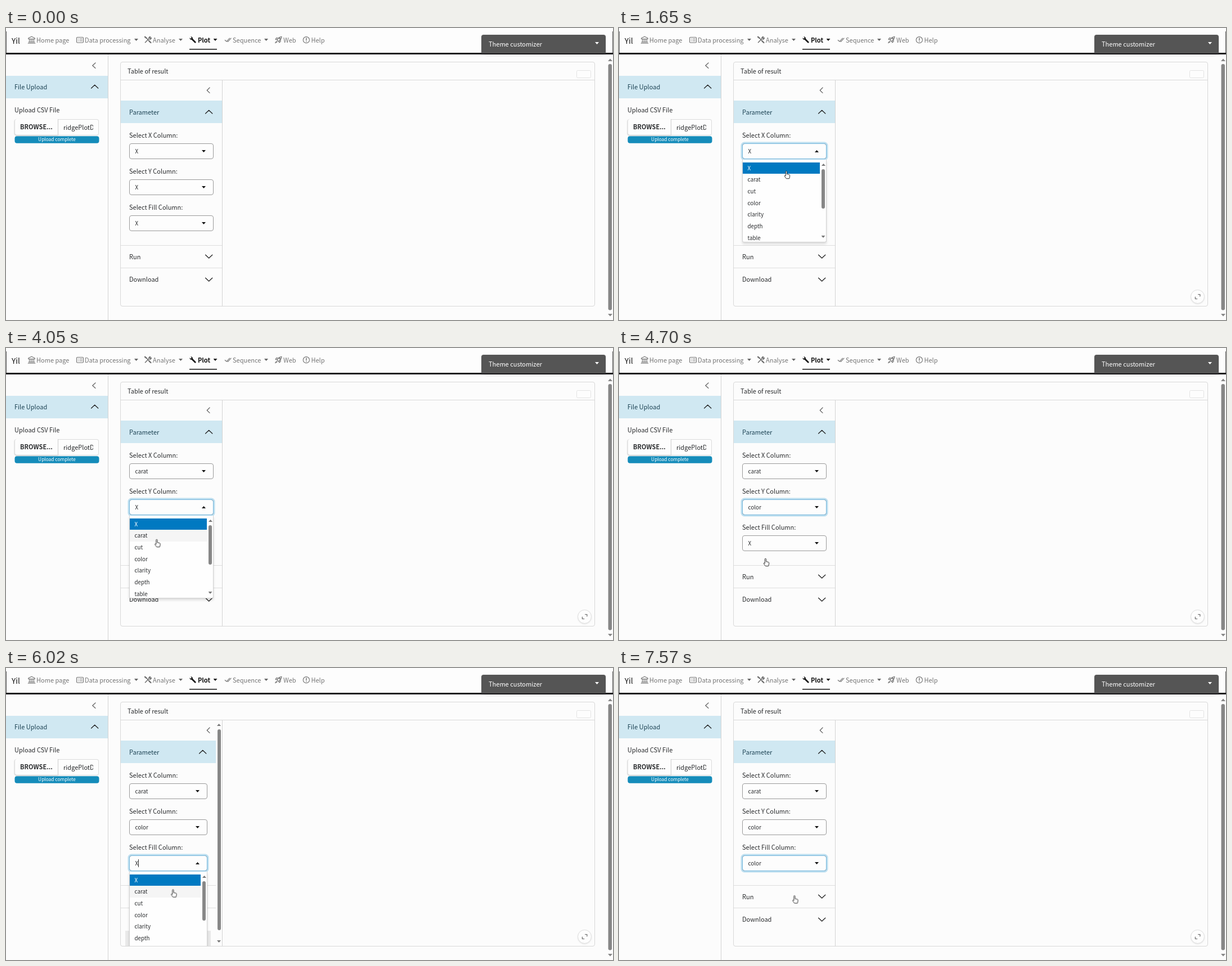
Write an HTML page that moves like this. It is 1079 by 519 pixels and loops after 8000 ms.

```html
<!DOCTYPE html>
<html lang="en">
<head>
<meta charset="utf-8">
<title>Ridge plot setup</title>
<style>
html, body { margin: 0; width: 100%; height: 100%; overflow: hidden; background: #fcfcfc; }
body, #stage { font: 11.03px/20px "Noto Sans CJK SC", "Noto Sans CJK JP", "Noto Sans", sans-serif; color: #2a2c2e; }
#stage { position: absolute; left: 0; top: 0; width: 1079px; height: 519px; overflow: hidden; }
#stage div, #stage span, #stage svg { position: absolute; box-sizing: border-box; white-space: nowrap; }
.band { background: #d0e8f2; height: 40px; color: #1d4354; }
.rule { left: 0; right: 0; height: 1px; background: #dedede; }
.line { fill: none; stroke: #222; stroke-width: 1.3; stroke-linecap: round; stroke-linejoin: round; }
.anim { animation: 8s step-end infinite; }
.bar { background: #878787; border-radius: 3px; }

#browse { left: 15px; top: 162px; width: 78px; height: 28px; background: #fdfdfd; border-radius: 4px 0 0 4px;
  border-left: 1px solid #ddd; border-right: 1px solid #ccc; box-shadow: 0 1px 2px #bbb; }
#file { left: 93px; top: 162px; width: 72px; height: 29px; border: 1px solid #dcdcdc; border-left: 0; border-radius: 0 4px 4px 0; background: #fdfdfd; }
#file span { left: 9px; top: 3px; width: 53px; overflow: hidden; }
#done { left: 15px; top: 191px; width: 151px; height: 13px; color: #fff; font-size: 8.35px; line-height: 13px; text-align: center; }
#theme { left: 845px; top: 12px; width: 221px; height: 33px; border-radius: 4px 4px 0 0; background: #555; color: #fff; box-shadow: 0 1px 3px #0003; }
#card { left: 203px; top: 60px; width: 844px; height: 435px; border: 1px solid #d8d8d8; border-radius: 4px; }
#pane { left: 204px; top: 93px; width: 181px; height: 401px; overflow: hidden; border-right: 1px solid #d4d4d4; }
#inner { left: 0; top: 0; width: 180px; height: 401px; animation-name: narrow; }
#full { left: 1016px; top: 465px; width: 25px; height: 25px; border: 1px solid #dedede; border-radius: 50%;
  background: #fdfdfd; box-shadow: 0 1px 2px #e6e6e6; animation: full 8s linear infinite; }

.box { left: 15px; right: 15px; height: 28px; border: 1px solid #9a9a9a; border-radius: 4px; background: #fdfdfd; }
.ring { left: 15px; right: 15px; height: 28px; border: 1px solid #75b6db; border-radius: 4px; box-shadow: 0 0 0 2.5px #bddff0; animation: 8s linear infinite; }
.val, .row { font-size: 9.8px; left: 9.5px; }
.caret { left: 15px; width: 1px; height: 14px; background: #333; }
.tri { width: 7px; height: 4px; background: #111; clip-path: polygon(0 0, 100% 0, 50% 100%); }
.up { transform: rotate(180deg); }
.drop { left: 15px; right: 15px; height: 147px; z-index: 5; background: #fefefe; border: solid #d2d2d2; border-width: 0 1px 1px;
  border-radius: 0 0 3px 3px; box-shadow: 0 3px 4px #0002; overflow: hidden; }
.shade { left: 8px; right: 9px; top: 374px; height: 27px; background: #e9e9e9; z-index: 4; }
.hit { left: 0; right: 11px; height: 20.7px; background: #f5f5f5; }
.pick { background: #0079c1; }
.row { left: 8.5px; }

#cursor { left: -8px; top: -10px; width: 20px; height: 24px; z-index: 9; animation: move 8s linear infinite; }
#cursor path { fill: #fff; stroke: #222; stroke-width: .95; stroke-linejoin: round; }
#arrow { animation-name: arrow; }
#hand { animation-name: hand; }
@keyframes narrow { 0% { width: 180px; } 72.125% { width: 169px; } 85.75% { width: 180px; } }
@keyframes full { 0%, 4% { opacity: 0; } 6%, 100% { opacity: 1; } }
</style>
</head>
<body>
<div id="stage">
  <svg width="1079" height="519" viewBox="0 0 1079 519" style="left:0;top:0">
    <path d="M0 0H1079V44H0z" fill="#fdfdfd"/>
    <path d="M.5 6V44M1078.5 6V44" stroke="#555"/>
    <path d="M0 44H1079V47H0z" fill="#1b1a1d"/>
    <path d="M850 47.5H1062V49.5Q1060 50.5 1056 50.5H856Q850 50.5 850 47.5z" fill="#eee"/>
    <path d="M181.5 47V519" stroke="#d4d4d4"/>
    <path d="M204 92.5H1046" stroke="#d8d8d8"/>
    <rect x="1014.5" y="75.5" width="25" height="13" rx="2" fill="#fdfdfd" stroke="#e3e3e3"/>
    <rect x="15.5" y="192.3" width="150" height="12.4" rx="4" fill="#158cba"/>
    <path d="M326 37H375V38.6H326z" fill="#111"/>
    <g fill="none" stroke="#707070" stroke-width="1.1" stroke-linecap="round" stroke-linejoin="round">
      <path d="M39.8 19.5V18L45.5 15.2 51.2 18V19.5zM41.5 20V25M44.2 20V25M46.8 20V25M49.5 20V25M40 25.3H51M39.3 27.2H51.8"/>
      <rect x="125.5" y="16.5" width="12" height="9.5" rx="1.4"/>
      <path d="M128 19.5H128.8M131 19.5H135.5M128 22.8H128.8M131 22.8H135.5"/>
      <path d="M248 16L256.5 25.3M247.5 25.8L254 19M254 19Q253.3 16 256.4 15.6L255.6 17.6 257 18.6 258.2 17.4Q258.2 20.3 255.3 20.2" stroke-width="1.5"/>
      <path d="M247 15.8L249.5 17.8M254.6 23.3L257.4 26" stroke-width="2.3"/>
      <path d="M389.3 21.5L392 24.2 397.5 18.2M393.8 23.8L394.4 24.3 400 18.2"/>
      <path d="M482 22Q484 16 490 15.4 489.6 21.2 483.8 23.8zM482 20L479 20.4 480.6 17.6 483.2 17.8M485.8 23L485.4 26 488 24.4 488 21.6M480.8 23.5L478.6 26.6 482 24.8"/>
      <circle cx="486.7" cy="18.6" r="1"/>
      <circle cx="533.8" cy="21.2" r="5.6"/>
      <path d="M533.8 18V21.8M533.8 24V24.2" stroke-width="1.4"/>
    </g>
    <path d="M330.2 19.2L336.3 25.3" stroke="#111" stroke-width="2.7" stroke-linecap="round"/>
    <path d="M328.3 15.4Q331.2 14.9 332 18 331.6 20.6 329 20.8 326.4 20.4 326.5 17.3L328.5 19 330 17.4z" fill="#111"/>
    <g fill="#868686">
      <path d="M1070 59L1074 54.5 1078 59zM1070 508L1074 512.5 1078 508z"/>
      <rect x="1070.5" y="64" width="6.5" height="437.5" rx="3.2"/>
    </g>
    <path class="line" d="M159 62L153.8 66.7 159 71.4" style="stroke:#666"/>
  </svg>
  <div id="nav"></div>
  <div id="theme"><span style="left:13px;top:6px">Theme customizer</span><span class="tri" style="left:202px;top:13px;background:#fff"></span></div>
  <div class="band" style="left:0;top:85px;width:181px"><span style="left:15px;top:9px">File Upload</span></div>
  <span style="left:15px;top:135px">Upload CSV File</span>
  <div id="browse"><b><span style="left:9px;top:3px">BROWSE...</span></b></div>
  <div id="file"><span>ridgePlotD</span></div>
  <div id="done">Upload complete</div>
  <div id="card"><span style="left:12px;top:5px">Table of result</span></div>
  <div id="pane"><div id="inner" class="anim"></div></div>
  <svg class="line" width="10" height="14" style="left:355px;top:104px;stroke:#666"><path d="M7 2L2.3 6.7 7 11.4"/></svg>
  <div id="full"><svg class="line" width="23" height="23" style="left:0;top:0;stroke:#666;stroke-width:1.2"><path d="M12.5 7.5H15.8V10.8M7.4 12.2V15.5H10.7"/></svg></div>
  <svg id="cursor" viewBox="-8 -10 20 24">
    <path id="arrow" class="anim" d="M-1.5-7V5.2L1.3 2.6 3.2 6.8 5 6 3.1 1.9H7z"/>
    <path id="hand" class="anim" d="M-2.7 1V-5.7A1.1 1.1 0 0 1-.5-5.7V-1.3L3.2-.6Q4.7-.2 4.7 1.3C4.7 3.4 4.2 4.4 3.6 6.6H-1.6L-4.7 2.4Q-5.2 1.3-4.2 1.1-3.4.9-2.7 2z"/>
  </svg>
</div>
<script>
const $ = id => document.getElementById(id);
const LOOP = 8000, ROW = 20.7;
const options = ['X', 'carat', 'cut', 'color', 'clarity', 'depth', 'table'];
let css = '';

// stops: [time in ms, declarations]
function keys(name, stops) {
  css += `@keyframes ${name}{${stops.map(([t, v]) => `${t / LOOP * 100}%{${v}}`).join('')}}\n`;
}
// visible inside the given time spans
function show(name, ...spans) {
  const stops = spans.flatMap(([a, b]) => [[a, 'opacity:1'], [b, 'opacity:0']]);
  if (spans[0][0] > 0) stops.unshift([0, 'opacity:0']);
  keys(name, stops);
}
const text = (x, y, s, style = '') => `<span style="left:${x}px;top:${y}px;${style}">${s}</span>`;
const tri = (x, y, color) => `<span class="tri" style="left:${x}px;top:${y}px;background:${color}"></span>`;
const chevron = (y, up) => `<svg class="line" width="15" height="10" style="right:16px;top:${y}px">
  <path d="${up ? 'M1.6 8L7.7 2.2 13.8 8' : 'M1.6 2.2L7.7 8 13.8 2.2'}"/></svg>`;
const arrows = (right, top, bottom) => `<span class="tri up" style="right:${right}px;top:${top}px;background:#777"></span>
  <span class="tri" style="right:${right}px;top:${bottom}px;background:#777"></span>`;

const grey = 'color:#767676';
$('nav').innerHTML = text(10, 12, 'Yil', 'font-size:13.5px;color:#111') +
  [[54, 'Home page'], [140, 'Data processing', 228], [261, 'Analyse', 307], [403, 'Sequence', 459], [493, 'Web'], [542.5, 'Help']]
    .map(([x, s, t]) => text(x, 11, s, grey) + (t ? tri(t, 19, '#666') : '')).join('') +
  text(341, 11, 'Plot', 'font-weight:700;color:#111') + tri(368.5, 19, '#111');
document.querySelector('.band').innerHTML += chevron(14, true);

function field(f, i) {
  const top = 112 + 64 * i, n = i + 1, open = f.focus + 80;
  show('drop' + n, [open, f.close]);
  show('before' + n, [0, f.close]);
  keys('after' + n, [[0, 'opacity:0'], [f.close, 'opacity:1'], [LOOP, 'opacity:1']]);
  keys('flip' + n, [[0, 'transform:none'], [open, 'transform:rotate(180deg)'], [f.close, 'transform:none']]);
  const blinks = [];
  for (let t = f.focus; t < f.close; t += 1000) blinks.push([t, Math.min(t + 500, f.close)]);
  show('caret' + n, ...blinks);
  keys('hover' + n, [[0, 'opacity:0'], ...f.hover.map(([t, row]) => [t, `opacity:1;top:${4.5 + row * ROW}px`]), [f.close, 'opacity:0']]);
  const on = 'opacity:1', off = 'opacity:0';
  keys('ring' + n, [[0, off], [f.focus, off], [f.focus + 150, on],
    ...(f.blur ? [[f.blur, on], [f.blur + 150, off], [LOOP, off]] : [[LOOP, on]])]);

  const anim = (name, cls, style = '', body = '') =>
    `<div class="anim ${cls}" style="animation-name:${name}${n};${style}">${body}</div>`;
  const rows = options.map((s, r) => `<span class="row" style="top:${4.5 + r * ROW}px">${s}</span>`);
  rows[0] = rows[0].replace('style="', 'style="color:#fff;');
  return text(15, top - 25, `Select ${f.label} Column:`) +
    `<div class="box" style="top:${top}px">` +
      anim('before', 'val', 'top:3px', 'X') + anim('after', 'val', 'top:3px', f.value) +
      anim('caret', 'caret', 'top:6px') + anim('flip', 'tri', 'right:13px;top:11px') +
    `</div><div class="ring" style="top:${top}px;animation-name:ring${n}"></div>` +
    (i === 2 ? anim('drop', 'shade') : '') +
    anim('drop', 'drop', `top:${top + 29}px`,
      `<div class="hit pick" style="top:4.5px"></div>` + anim('hover', 'hit') + rows.join('') +
      `<div class="bar" style="right:2px;width:6px;top:17px;height:70px"></div>` + arrows(1.5, 7, 135));
}

const fields = [
  { label: 'X', value: 'carat', focus: 850, close: 2170, blur: 3480, hover: [[1700, 1]] },
  { label: 'Y', value: 'color', focus: 3480, close: 4700, blur: 5690, hover: [[3960, 1], [4110, 2], [4380, 3]] },
  { label: 'Fill', value: 'color', focus: 5690, close: 6860, hover: [[5920, 1], [6150, 2], [6340, 3]] }
];
$('inner').innerHTML =
  `<div class="band" style="left:0;right:0;top:36px">${text(15, 10, 'Parameter')}${chevron(15, true)}</div>
   <div class="rule" style="top:293px"></div><div class="rule" style="top:333px"></div>` +
  text(15, 303, 'Run') + chevron(308) + text(15, 343, 'Download') + chevron(349) +
  fields.map(field).join('');
$('pane').innerHTML += `<div class="anim" style="animation-name:drop3;right:0;top:0;width:11px;height:401px">
  <div class="bar" style="left:3px;width:6px;top:16px;height:357px"></div>${arrows(2, 6, 391)}</div>`;

const path = [
  [0, 690, -14], [190, 690, -14], [340, 586, 84], [440, 496, 155], [560, 405, 203], [710, 351, 223],
  [1370, 351, 223], [1650, 299, 261], [1830, 297, 281], [2170, 297, 281], [2330, 335, 296], [2560, 378, 303],
  [2970, 351.5, 293.5], [3640, 351.5, 293.5], [4050, 269.5, 347], [4240, 264.5, 362], [4290, 264.5, 362],
  [4500, 262, 381], [4750, 262, 381], [5320, 355.5, 353], [5770, 355.5, 353], [6020, 298.5, 400.5],
  [6490, 288, 444], [6900, 288, 444], [7570, 313.5, 411.5], [LOOP, 313.5, 411.5]
];
keys('move', path.map(([t, x, y]) => [t, `transform:translate(${x}px,${y}px)`]));
show('arrow', [0, 650], [2480, 2800], [4800, 5080]);
show('hand', [650, 2480], [2800, 4800], [5080, LOOP]);
document.head.appendChild(document.createElement('style')).textContent = css;
</script>
</body>
</html>
```
